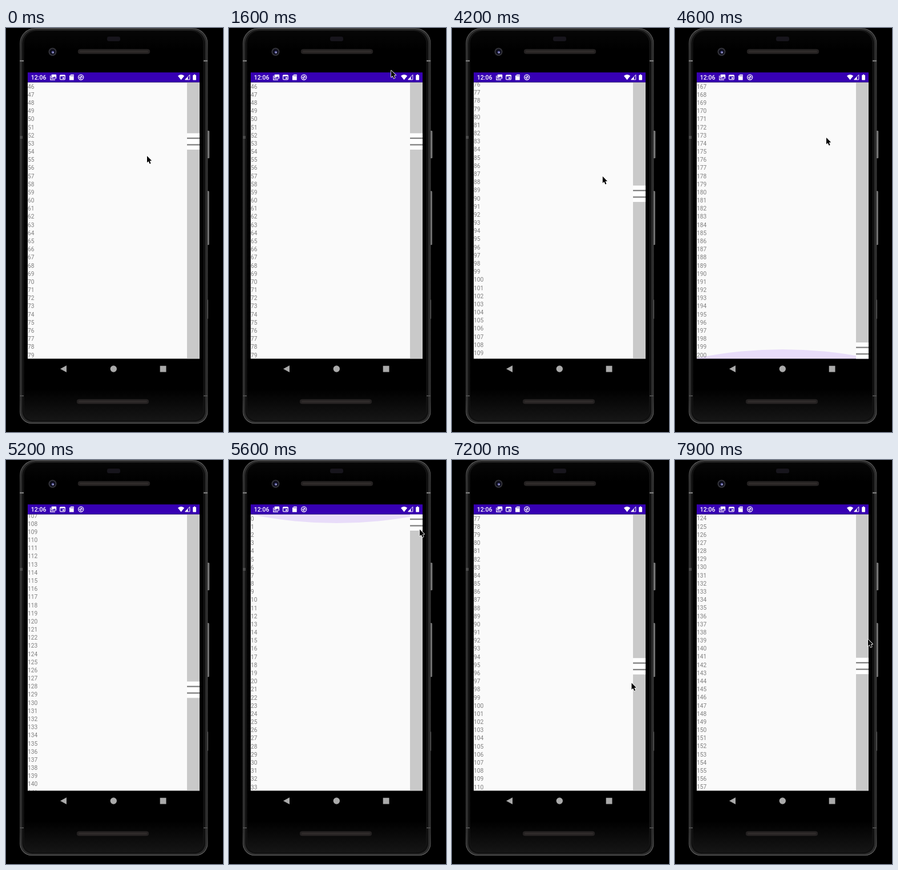
Animation of 380x704 px, one loop 8000 ms. Source, as an HTML page with a canvas:

```html
<!DOCTYPE html>
<html lang="en">
<head>
<meta charset="utf-8">
<title>Fast scroller</title>
<style>
  html, body { margin: 0; width: 100%; height: 100%; overflow: hidden; background: #000; }
  canvas { display: block; width: 380px; height: 704px; }
</style>
</head>
<body>
<canvas id="stage"></canvas>
<script>
const W = 380, H = 704, LOOP = 8000, STEP = 100;
const LEFT = 38, RIGHT = 339, BAR = 77.4, TOP = 94.5, BOTTOM = 576.5;
const TRACK = 317, THUMB = 28.5;
const ROWS = 201, PITCH = 14.18, LAST = 167;
const PURPLE = '#3700b3', WHITE = '#fff';

const canvas = document.getElementById('stage');
const c = canvas.getContext('2d');
const dpr = window.devicePixelRatio || 1;
canvas.width = W * dpr;
canvas.height = H * dpr;

// Free pointer path before the thumb is grabbed: [time, x, y]
const path = [[500, 247, 223], [900, 270, 72], [1100, 270, 72], [1350, 206, 84],
  [1600, 284, 74], [2000, 350, 80], [2600, 292, 176], [3100, 289, 334],
  [3500, 325, 75], [3900, 262, 360], [4400, 265, 191], [4700, 265, 191], [5000, 335, 566]];

const ramp = (t, a, b) => Math.min(1, Math.max(0, (t - a) / (b - a)));
const ease = (t, a, b) => { const p = ramp(t, a, b); return p * p * (3 - 2 * p); };

// First visible row: fling to the end, drag to the start, drag down, drag back.
function firstRow(t) {
  return 46 + (LAST - 46) * ramp(t, 4100, 4500) - LAST * ramp(t, 5000, 5560)
    + 154 * ease(t, 6600, 7800) - 100 * ease(t, 7766, 8135);
}

const trackY = row => TOP + row / LAST * (BOTTOM - TOP - THUMB);

// The list trails the thumb, and the thumb trails the pointer.
const ahead = (t, lag) => trackY(firstRow(t > 6000 ? t + lag : t));
const thumbTop = t => ahead(t, 80) - 36 * (1 - ramp(t, 4100, 4500));

function pointerAt(t) {
  if (t >= 5000) {
    const x = 334 - 19.5 * ease(t, 6400, 7200) + 23.5 * ease(t, 7400, 7900);
    return [x, Math.max(121, ahead(t, 130) + 18)];
  }
  const i = path.findIndex(k => k[0] > t);
  if (i === 0) return path[0].slice(1);
  const [t0, x0, y0] = path[i - 1], [t1, x1, y1] = path[i];
  const p = ramp(t, t0, t1);
  return [x0 + (x1 - x0) * p, y0 + (y1 - y0) * p];
}

function rect(x, y, w, h, color) {
  c.fillStyle = color;
  c.fillRect(x, y, w, h);
}

function paint(fill, stroke, width) {
  if (stroke) { c.strokeStyle = stroke; c.lineWidth = width; c.stroke(); }
  if (fill) { c.fillStyle = fill; c.fill(); }
}

function round(x, y, w, h, r, fill, stroke, width = 1) {
  c.beginPath();
  c.roundRect(x, y, w, h, r);
  paint(fill, stroke, width);
}

function disc(x, y, r, fill, stroke, width = 1) {
  c.beginPath();
  c.arc(x, y, r, 0, Math.PI * 2);
  paint(fill, stroke, width);
}

function poly(points, fill, stroke, width = 1) {
  c.beginPath();
  points.forEach(([x, y]) => c.lineTo(x, y));
  c.closePath();
  paint(fill, stroke, width);
}

function shade(x0, y0, x1, y1, ...stops) {
  const g = c.createLinearGradient(x0, y0, x1, y1);
  stops.forEach(([p, color]) => g.addColorStop(p, color));
  return g;
}

function sideButton(y, h, w) {
  round(351, y, w, h, 1.5, shade(351, 0, 351 + w, 0, [0, '#2c2c2c'], [0.6, '#8a8a8a'], [1, '#4a4a4a']));
}

function speaker(x, y) {
  round(x, y, 126, 8, 4, '#242121', '#131212');
  round(x + 3, y + 2.5, 120, 3, 1.5, '#302c2b');
}

function drawPhone() {
  rect(0, 0, W, H, '#000');
  sideButton(179, 48, 5.5);
  sideButton(284, 94, 5);
  sideButton(473, 34, 3);

  const rim = shade(0, 0, 0, 688, [0, '#777'], [0.06, '#484848'], [0.94, '#484848'], [1, '#808080']);
  round(25, 1, 327.5, 687.5, [26, 26, 20, 20], '#2b2b2b', rim, 1.6);
  round(28.2, 3.4, 321, 682.5, [24, 24, 18, 18], '#101010', '#3c3c3c', 1);
  round(31.5, 5, 314, 678, [22, 22, 17, 17],
    shade(0, 5, 0, 683, [0, '#060606'], [0.05, '#000'], [0.92, '#000'], [1, '#151515']), '#1b1b1b');

  for (const x of [24, 346]) {
    rect(x, 56, 7, 2.5, '#777');
    rect(x, 640, 7, 2, '#4a4a4a');
  }
  rect(24, 188, 5, 5, '#4a4a4a');

  round(177, 15, 23, 8, 3, '#17151c');
  disc(81.5, 41.5, 7, '#34343a');
  disc(81.5, 41.5, 5, '#0d0d1a');
  disc(82, 42.3, 2.3, '#5a5a9c');
  disc(82.5, 43, 1, '#c8c8e0');
  speaker(126, 37);
  speaker(124, 647);
}

function drawNav() {
  poly([[95, 594], [106, 588], [106, 600]], '#aaa');
  disc(188.3, 594, 5.7, '#aaa');
  rect(269.7, 588.7, 10.8, 10.8, '#aaa');
}

function drawStatus() {
  rect(LEFT, BAR, RIGHT - LEFT, TOP - BAR, PURPLE);
  c.fillStyle = WHITE;
  c.font = '500 10.5px Roboto, sans-serif';
  c.fillText('12:06', 43.7, 89.8);

  // Pictures
  c.beginPath();
  c.moveTo(77.8, 83); c.lineTo(77.8, 90.3); c.lineTo(86, 90.3);
  paint(null, WHITE, 1.2);
  round(79.6, 81, 8.6, 7.6, 1, WHITE);
  poly([[80.6, 87.6], [82.5, 85], [83.7, 86.4], [85.3, 84.2], [87.4, 87.6]], PURPLE);

  // Calendar
  round(94.6, 82, 8.8, 7.8, 1, null, WHITE, 1.2);
  rect(94.6, 82, 8.8, 2.3, WHITE);
  rect(99, 86, 3, 2.4, WHITE);

  // Memory card
  poly([[111, 83.6], [113.6, 81], [118.7, 81], [118.7, 90.7], [111, 90.7]], WHITE);
  for (const x of [113.2, 115, 116.8]) rect(x, 82.2, 0.8, 2, PURPLE);

  // Ring
  disc(131.2, 85.8, 4.5, null, WHITE, 1.3);
  disc(131.2, 85.8, 2.6, WHITE);
  c.beginPath();
  c.moveTo(129, 83.6); c.lineTo(133.4, 88);
  paint(null, PURPLE, 1.1);

  // Wi-Fi, signal, battery
  c.beginPath();
  c.moveTo(306.6, 90.4);
  c.lineTo(301, 83.4);
  c.quadraticCurveTo(306.6, 79.2, 312.2, 83.4);
  paint(WHITE);
  poly([[313.6, 90], [321.8, 90], [321.8, 81.6]], null, WHITE, 1);
  poly([[313.6, 90], [318.6, 90], [318.6, 85]], WHITE);
  round(327.2, 82, 5.8, 8.8, 0.8, WHITE);
  rect(328.9, 80.9, 2.4, 1.5, WHITE);
}

function glow(y, alpha) {
  disc(188.5, y, 745, `rgba(98, 0, 238, ${alpha})`);
}

function drawList(t) {
  const first = firstRow(t), y = thumbTop(t);
  c.save();
  c.beginPath();
  c.rect(LEFT, TOP, RIGHT - LEFT, BOTTOM - TOP);
  c.clip();
  rect(LEFT, TOP, RIGHT - LEFT, BOTTOM - TOP, '#fafafa');

  c.fillStyle = '#7e7e7e';
  c.font = '10.25px Roboto, sans-serif';
  const start = Math.max(0, Math.floor(first) - 1);
  for (let n = start; n < Math.min(ROWS, start + 37); n++) {
    c.fillText(n, LEFT, 105.6 + (n - first) * PITCH);
  }

  glow(560 + 745, 0.12 * ramp(t, 4400, 4500) * (1 - ramp(t, 4600, 5000)));
  glow(110 - 745, 0.12 * ramp(t, 5500, 5600) * (1 - ramp(t, 5600, 6400)));

  rect(TRACK, TOP, RIGHT - TRACK, BOTTOM - TOP, '#c9c9c9');
  rect(TRACK, y, RIGHT - TRACK, THUMB, WHITE);
  for (const dy of [7.5, 18.9]) rect(TRACK, y + dy, RIGHT - TRACK, 2.3, '#808080');
  c.restore();
}

function drawPointer(t) {
  if (t >= 5100 && t < 5400) return;
  const [x, y] = pointerAt(t);
  const shape = [[0, 0], [0, 11.6], [2.6, 9.2], [4.7, 13.8], [6.6, 12.9], [4.7, 8.5], [8.2, 8.3]];
  c.lineJoin = 'round';
  poly(shape.map(([dx, dy]) => [x + dx, y + dy]), '#000', WHITE, 1.6);
  c.lineJoin = 'miter';
}

function draw(now) {
  const t = Math.floor((now % LOOP) / STEP) * STEP;
  c.setTransform(dpr, 0, 0, dpr, 0, 0);
  drawPhone();
  drawList(t);
  drawStatus();
  drawNav();
  drawPointer(t);
}

const began = performance.now();
function tick() {
  draw(performance.now() - began);
  requestAnimationFrame(tick);
}
tick();
</script>
</body>
</html>
```
